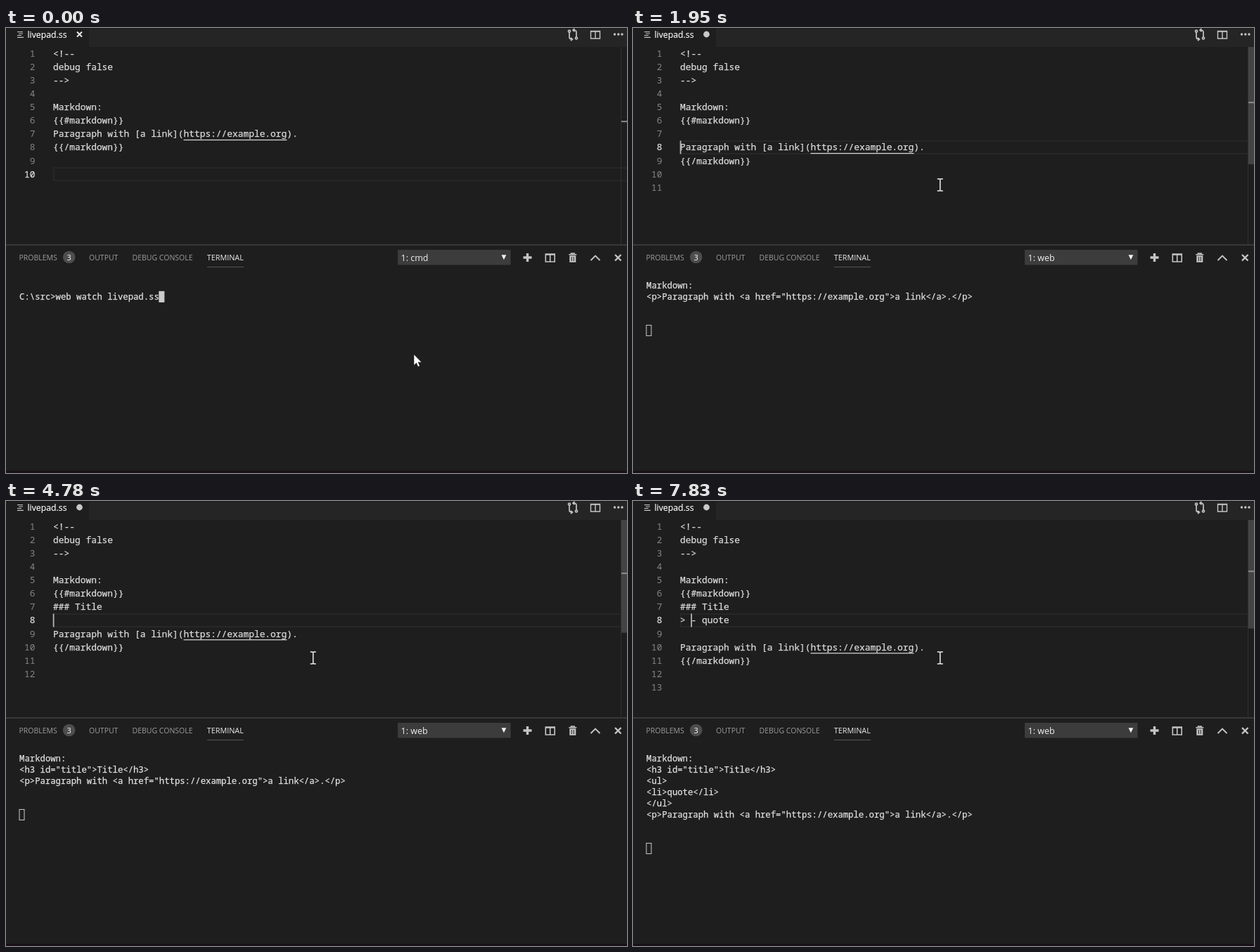
Write an HTML page that moves like this. It is 883 px wide and 634 px high and loops after 8 s.

```html
<!DOCTYPE html>
<html lang="en">
<head>
<meta charset="utf-8">
<title>Live preview</title>
<style>
  html, body { margin: 0; width: 100%; height: 100%; overflow: hidden; background: #1e1e1e; }
  svg { display: block; width: 100%; height: 100%; }
  text { white-space: pre; font-variant-ligatures: none; }
  .ui { font-family: "Open Sans", "Noto Sans", sans-serif; }
  .code { font: 12.88px "Noto Sans Mono", "DejaVu Sans Mono", monospace; fill: #dcdcdc; stroke: #dcdcdc; stroke-width: .25; }
  .term { font: 12.27px "Noto Sans Mono", "DejaVu Sans Mono", monospace; fill: #e2e2e2; stroke: #e2e2e2; stroke-width: .25; }
  .num { fill: #858585; stroke: none; }
  .num.on { fill: #dcdcdc; stroke: #dcdcdc; }
  .label { font-size: 10.5px; fill: #9c9c9c; }
  .line { fill: none; stroke: #c5c5c5; }
</style>
</head>
<body>
<svg viewBox="0 0 883 634" preserveAspectRatio="none">
  <rect width="883" height="634" fill="#1e1e1e"/>
  <rect x="118" width="765" height="27" fill="#252526"/>
  <rect width="883" height="1" fill="#191919"/>
  <rect y="631" width="883" height="3" fill="#190f17"/>

  <!-- tab -->
  <path class="line" stroke-width="1.2" d="M16 5.5h8M18 8h6M16 10.5h6M16 13.3h9"/>
  <text class="ui" x="30.5" y="14" font-size="12.25" fill="#fff" stroke="#fff" stroke-width=".15">livepad.ss</text>
  <path id="saved" d="M101 5.5l7 7m0-7l-7 7" fill="none" stroke="#eee" stroke-width="1.9"/>
  <circle id="dirty" cx="104.5" cy="9" r="4.4" fill="#c8c8c8"/>

  <!-- editor actions -->
  <g class="line" stroke-width="1.7">
    <path d="M801 6v7q0 3 4 3M811 13V6q0-3-4-3M808.5 .8l-2.5 2.2 2.5 2.2M803 13.8l2.5 2.2-2.5 2.2"/>
    <circle cx="801" cy="4.5" r="1.5"/><circle cx="811" cy="14.5" r="1.5"/>
    <path stroke-width="1.4" d="M831.5 4.5h13v10.5h-13zM838 4v11M831 5h14"/>
  </g>
  <g fill="#c5c5c5"><circle cx="865.5" cy="9" r="1.7"/><circle cx="870.8" cy="9" r="1.7"/><circle cx="876" cy="9" r="1.7"/></g>

  <!-- editor -->
  <rect id="current" x="67.7" width="830" height="18" fill="none" stroke="#2b2b2b" stroke-width="1.5"/>
  <rect id="select" x="67" width="7.73" height="19.1" fill="#264f78"/>
  <g id="code"></g>
  <rect id="caret" width="1.8" height="19" fill="#b4b5b3"/>
  <path d="M874.5 27v281" stroke="#303030"/>
  <rect id="slider" x="875" y="27" width="8" fill="#434343"/>
  <rect id="mark" x="875" width="8" height="2" fill="#8c8c8c"/>

  <!-- panel -->
  <path d="M0 309h883" stroke="#414141" stroke-width="1.5"/>
  <g class="ui label">
    <text x="18.5" y="331">PROBLEMS</text>
    <text x="118" y="331">OUTPUT</text>
    <text x="179.5" y="331">DEBUG CONSOLE</text>
    <text x="285.8" y="331" font-size="10.8" fill="#ececec">TERMINAL</text>
  </g>
  <path d="M286 340.5h52" stroke="#555"/>
  <circle cx="89.7" cy="326.5" r="8.8" fill="#4d4d4d"/>
  <text class="ui" x="89.7" y="330.5" font-size="11" text-anchor="middle" fill="#fff">3</text>
  <rect x="557" y="316" width="160.5" height="21.5" fill="#3c3c3c"/>
  <text class="ui" id="shell" x="561.5" y="332.3" font-size="12.5" fill="#f0f0f0"></text>
  <path d="M704.5 323.3h6.8l-3.4 7z" fill="#f0f0f0"/>
  <g class="line">
    <path d="M741.5 321v12M735.5 327h12" stroke-width="3.4"/>
    <path d="M767.3 322h12.9v11h-12.9zM773.7 322v11M767 323h13.5" stroke-width="1.6"/>
    <path d="M800.3 322.8h11M803.5 322.5v-1.5h4.6v1.5" stroke-width="1.6"/>
    <path d="M801.3 324.3h9v9.5h-9z" fill="#c5c5c5" stroke="none"/>
    <path d="M804.3 326v6M807.3 326v6" stroke="#1e1e1e"/>
    <path d="M831.5 331l6.5-6.5 6.5 6.5" stroke-width="1.9"/>
    <path d="M866 323l8.500 8.500m0-8.500l-8.500 8.500" stroke-width="2.4"/>
  </g>
  <g id="term"></g>
  <rect id="block" stroke="#ccc"/>

  <!-- pointer -->
  <path id="arrow" d="M0 0v15.5l3.5-3.300 2.400 5.300 2.500-1.100-2.400-5.200h4.900z" fill="#fff" stroke="#111" stroke-width=".5"/>
  <path id="beam" d="M-4-8.5h3l1 1 1-1h3M0-7.5v15M-4 8.5h3l1-1 1 1h3" fill="none" stroke="#f0f0f0" stroke-width="1.5"/>
</svg>
<script>
const LOOP = 8000, ROW = 19.12, CHAR = 7.73, TROW = 16.03, TCHAR = 7.365;
const $ = id => document.getElementById(id);
const url = 'https://example.org';
const link = `Paragraph with <a href="${url}">a link</a>.</p>`;
const para = '<p>' + link;
const page = (...lines) => ['Markdown:', ...lines, para];
const head = n => `<h${n} id="title">Title</h${n}>`;
const quote = text => ['### Title', text];

const start = {
  body: [], row: 10, col: 0, caret: false, dirty: false, sel: false, focus: false,
  shell: '1: cmd', out: ['', 'C:\\src>web watch livepad.ss'], tcur: [27, 1]
};
const steps = [
  [100, { tcur: [0, 2] }],
  [140, { shell: '1: web' }],
  [540, { out: page(), tcur: null }],
  [1240, { focus: true, caret: true }],
  [1380, { row: 9 }],
  [1610, { row: 8 }],
  [1700, { row: 7 }],
  [1860, { body: [''], row: 8, dirty: true }],
  [2120, { row: 7 }],
  ...[...'# Title'].map((c, i) => [2200 + i * 82, { body: ['# Title'.slice(0, i + 1)], col: i + 1 }]),
  [2780, { dirty: false, col: 0 }],
  [2860, { out: page(head(1)), caret: false }],
  [3170, { caret: true }],
  [3510, { body: ['## Title'], col: 1, dirty: true }],
  [3960, { out: page(head(2)), dirty: false }],
  [4120, { body: ['### Title'], col: 2, dirty: true }],
  [4520, { dirty: false }],
  [4670, { out: page(head(3)) }],
  [4780, { body: quote(''), row: 8, col: 0, dirty: true }],
  ...[4940, 5010, 5180, 5330, 5560, 5640, 5720].map((t, i) =>
    [t, { body: quote('> quote'.slice(0, i + 1)), col: i + 1 }]),
  [6030, { dirty: false }],
  [6190, { out: ['Markdown:', head(3), '<blockquote>', '<p>quote', link, '</blockquote>'], caret: false }],
  [6330, { body: [...quote('> quote'), ''], row: 9, col: 0, caret: true, dirty: true }],
  [6650, { dirty: false }],
  [6720, { out: page(head(3), '<blockquote>', '<p>quote</p>', '</blockquote>') }],
  [6800, { row: 8 }],
  [6950, { sel: true, col: 1 }],
  [7170, { body: [...quote('- quote'), ''], sel: false, dirty: true }],
  [7590, { dirty: false }],
  [7650, { out: page(head(3), '<ul>', '<li>quote</li>', '</ul>'), col: 0 }],
  [7830, { body: [...quote('> - quote'), ''], col: 2, dirty: true }]
];

// pointer path: time, x, y
const path = [[540, 580, 465], [700, 540, 400], [850, 470, 282], [1000, 443.5, 232], [1090, 439, 227], [1160, 436.7, 223.5]];

function node(parent, tag, attrs, text) {
  const el = document.createElementNS('http://www.w3.org/2000/svg', tag);
  set(el, attrs);
  if (text) el.textContent = text;
  parent.append(el);
}
function set(el, attrs) {
  for (const k in attrs) el.setAttribute(k, attrs[k]);
}
const show = (id, on) => set($(id), { visibility: on ? 'visible' : 'hidden' });
const rowTop = row => 27 + (row - 1) * ROW;

function drawEditor(s) {
  const lines = ['<!--', 'debug false', '-->', '', 'Markdown:', '{{#markdown}}',
    ...s.body, `Paragraph with [a link](${url}).`, '{{/markdown}}', '', ''];
  const g = $('code');
  g.replaceChildren();
  lines.forEach((line, i) => {
    const y = rowTop(i + 1) + 13.6, on = i + 1 === s.row ? ' on' : '';
    node(g, 'text', { class: 'code num' + on, x: 41.5, y, 'text-anchor': 'end' }, i + 1);
    node(g, 'text', { class: 'code', x: 67.1, y }, line);
    const at = line.indexOf(url);
    if (at > 0) node(g, 'rect', { x: 67 + at * CHAR, y: y + 3.6, width: url.length * CHAR, height: 1.2, fill: '#dcdcdc' });
  });

  const top = rowTop(s.row), ratio = 281 / (281 + (lines.length - 1) * ROW);
  set($('current'), { y: top + .3 });
  set($('select'), { y: top });
  set($('caret'), { x: 66.7 + s.col * CHAR, y: top - .3 });
  set($('slider'), { height: 281 * ratio });
  set($('mark'), { y: 25.5 + (s.row - 1) * ROW * ratio });
  show('current', !s.sel);
  show('select', s.sel);
  show('caret', s.caret);
  show('saved', !s.dirty);
  show('dirty', s.dirty);
}

function drawTerminal(s) {
  const g = $('term');
  g.replaceChildren();
  s.out.forEach((line, i) => node(g, 'text', { class: 'term', x: 19.1, y: 371.2 + i * TROW }, line));
  const [col, row] = s.tcur || [0, s.out.length + 2];
  set($('block'), {
    x: 19 + col * TCHAR, y: 359.3 + row * TROW, width: 7, height: 15, fill: s.focus ? 'none' : '#ccc'
  });
  $('shell').textContent = s.shell;
}

function drawPointer(t) {
  let i = path.findIndex(p => p[0] > t);
  if (i < 0) i = path.length;
  const a = path[Math.max(i - 1, 0)], b = path[Math.min(i, path.length - 1)];
  const k = a === b ? 0 : Math.max(0, (t - a[0]) / (b[0] - a[0]));
  const x = a[1] + (b[1] - a[1]) * k, y = a[2] + (b[2] - a[2]) * k;
  const inside = y < 308;
  for (const id of ['arrow', 'beam']) set($(id), { transform: `translate(${x} ${y})` });
  show('arrow', !inside);
  show('beam', inside);
  show('slider', inside);
}

let last = -1;
function draw(t) {
  const done = steps.filter(step => step[0] <= t);
  if (done.length !== last) {
    last = done.length;
    const s = Object.assign({}, start, ...done.map(step => step[1]));
    drawEditor(s);
    drawTerminal(s);
  }
  drawPointer(t);
}

const begin = performance.now();
function tick() {
  draw((performance.now() - begin) % LOOP);
  requestAnimationFrame(tick);
}
tick();
</script>
</body>
</html>
```
